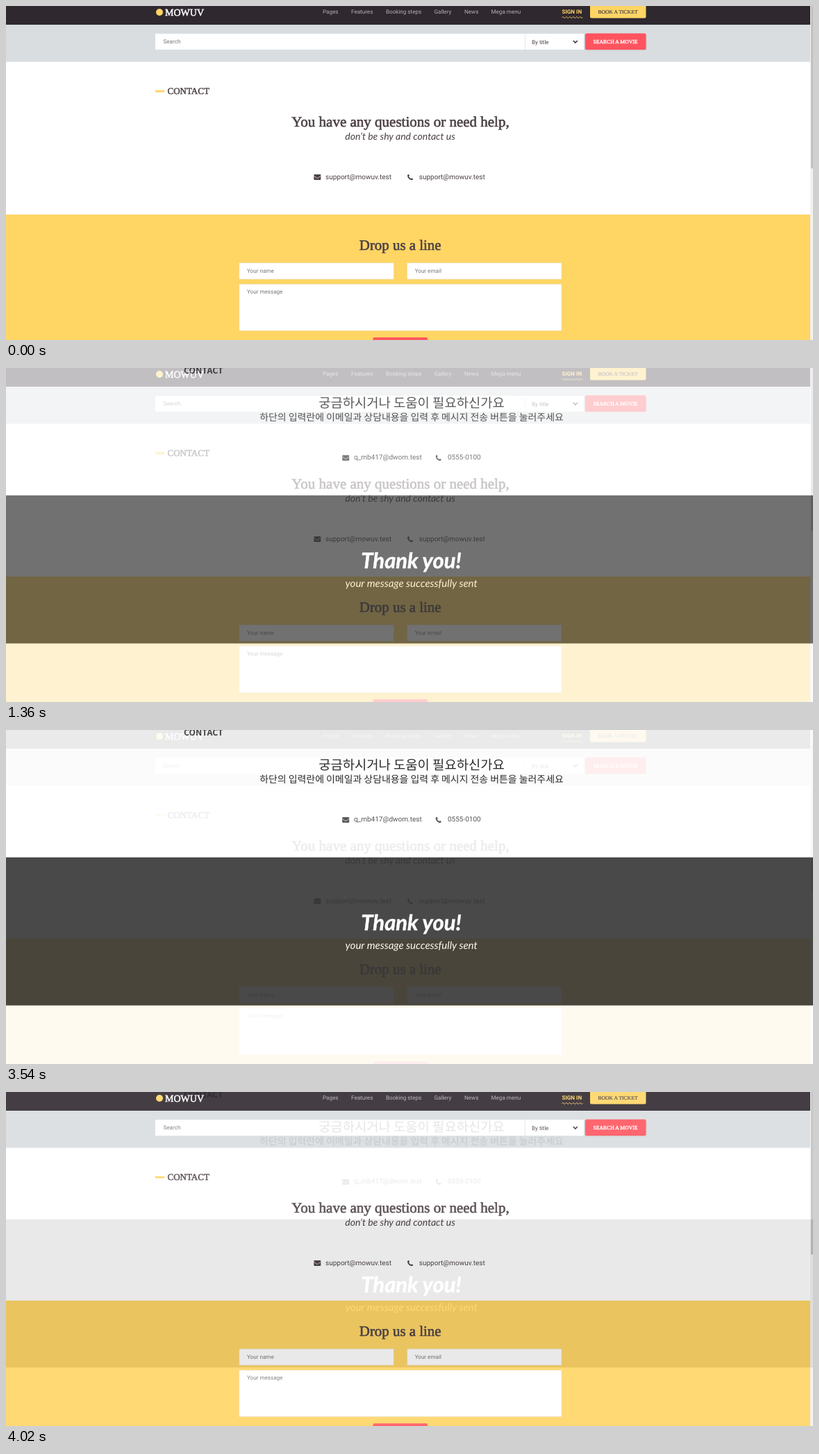
Animation, 1162 px wide and 482 px high, one loop 4080 ms. Source, as an HTML page:

```html
<!DOCTYPE html>
<html lang="en">
<head>
<meta charset="utf-8">
<title>Contact page crossfade</title>
<style>
  html, body { margin: 0; width: 100%; height: 100%; overflow: hidden; background: #fff; }
  svg { display: block; width: 1162px; height: 482px; }
  text { text-rendering: geometricPrecision; white-space: pre; }
  .ui { font-family: Roboto, Arial, sans-serif; font-size: 8.1px; }
  .mail { font-family: Roboto, Arial, sans-serif; font-size: 10px; }
  .slab { font-family: "Liberation Serif", "Times New Roman", serif; stroke-linejoin: round; }
  .slant { font-family: Lato, sans-serif; font-style: italic; }
  .kr { font-family: "Noto Sans CJK KR", "Noto Sans CJK", sans-serif; font-weight: 500; }
  .mid { text-anchor: middle; }
  .hint { fill: #777; }
</style>
</head>
<body>
<svg viewBox="0 0 1162 482" xmlns="http://www.w3.org/2000/svg">
  <defs>
    <g id="envelope">
      <rect width="10" height="8" rx="1"/>
      <path d="M0 2.2 4.2 5.2Q5 5.7 5.8 5.2L10 2.2" fill="none" stroke="#fff" stroke-width=".7"/>
    </g>
    <path id="phone" d="M1.8 0Q.2.5 0 2.1C.3 5.4 3.2 8.4 6.3 8.6Q7.9 8.4 8.2 6.8L6.1 5.5 5 6.5Q2.8 5.4 2 3.4L3 2.4Z"/>
  </defs>

  <g id="formPage">
    <rect width="1162" height="482" fill="#fff"/>
    <rect width="1158" height="27" fill="#2f282f"/>
    <circle cx="221" cy="9" r="5" fill="#ffd564"/>
    <text class="slab" x="229" y="14" font-size="14" fill="#fff" stroke="#fff" stroke-width=".5">MOWUV</text>
    <g id="nav" class="ui" fill="#b5b1b5"></g>
    <text class="ui" x="800.5" y="11" font-weight="700" fill="#ffd564">SIGN IN</text>
    <path id="wave" fill="none" stroke="#ffd564" stroke-width=".9"/>
    <rect x="841" y="-4" width="80.5" height="21.5" rx="2" fill="#ffd564"/>
    <text class="slab mid" x="881" y="11" font-size="7.65" fill="#4c4145" stroke="#4c4145" stroke-width=".2">BOOK A TICKET</text>

    <rect y="27" width="1158" height="53.5" fill="#d9dde0"/>
    <rect x="215" y="40" width="617" height="23" fill="#fff"/>
    <path d="M747.5 40v23" stroke="#e4e6e8"/>
    <text class="ui hint" x="226.5" y="54">Search</text>
    <text class="ui" x="757" y="54.5" fill="#4c4145">By title</text>
    <path d="M816.8 50l3 3 3-3" fill="none" stroke="#3d343a" stroke-width="1.6"/>
    <rect x="833" y="40" width="89.5" height="24.5" rx="3" fill="#8a5f68" opacity=".15"/>
    <rect x="834" y="39.5" width="87.5" height="23.5" rx="2" fill="#ff545f"/>
    <text class="slab mid" x="877.5" y="54" font-size="7.7" fill="#fff" stroke="#fff" stroke-width=".35">SEARCH A MOVIE</text>

    <rect x="215" y="121.5" width="13" height="3" fill="#ffd564"/>
    <g class="slab" fill="#4c4145" stroke="#4c4145">
      <text x="232.5" y="127" font-size="13" stroke-width=".45">CONTACT</text>
      <text class="mid" x="568" y="173.7" font-size="21" stroke-width=".65">You have any questions or need help,</text>
    </g>
    <text class="slant mid" x="567.5" y="192.5" font-size="14" fill="#4c4145">don’t be shy and contact us</text>
    <g class="mail" fill="#4c4145">
      <use href="#envelope" x="443.3" y="243"/>
      <text x="460" y="249.5">support@mowuv.test</text>
      <use href="#phone" x="578" y="242.7"/>
      <text x="594.8" y="249.5">support@mowuv.test</text>
    </g>

    <rect y="301" width="1158" height="181" fill="#ffd564"/>
    <text class="slab mid" x="567.7" y="351.7" font-size="20.9" fill="#4c4145" stroke="#4c4145" stroke-width=".65">Drop us a line</text>
    <g fill="#fff" stroke="#e9dcb4" stroke-width=".7">
      <rect x="335.8" y="370.8" width="222.5" height="23.4"/>
      <rect x="577.5" y="370.8" width="222.5" height="23.4"/>
      <rect x="335.8" y="401.3" width="464.2" height="67.4"/>
    </g>
    <g class="ui hint">
      <text x="347" y="384.5">Your name</text>
      <text x="588.7" y="384.5">Your email</text>
      <text x="347" y="415">Your message</text>
    </g>
    <rect x="528.5" y="478.3" width="78.5" height="10" rx="2" fill="#ff545f"/>

    <rect x="1158" width="4" height="482" fill="#f1f1f1"/>
    <rect x="1159" width="3" height="234.5" fill="#c1c1c1"/>
  </g>

  <g id="thanksPage" opacity="0">
    <rect width="1162" height="482" fill="#fff"/>
    <text class="kr" x="256" y="8" font-size="12.3" style="font-weight:700" fill="#444">CONTACT</text>
    <g class="kr mid" fill="#161616">
      <text x="584" y="57" font-size="18.8">궁금하시거나 도움이 필요하신가요</text>
      <text x="584" y="75.7" font-size="13.92">하단의 입력란에 이메일과 상담내용을 입력 후 메시지 전송 버튼을 눌러주세요</text>
    </g>
    <g class="mail" fill="#444">
      <use href="#envelope" x="484.2" y="125.8"/>
      <text x="501" y="132.2">q_mb417@dwom.test</text>
      <use href="#phone" x="618.7" y="125.3"/>
      <text x="636" y="132.2">0555-0100</text>
    </g>
    <rect y="183.8" width="1162" height="213.7" fill="#363636"/>
    <g class="slant mid" fill="#fff">
      <text x="583.5" y="289" font-size="31" font-weight="700" stroke="#fff" stroke-width=".5">Thank you!</text>
      <text x="583.7" y="315.5" font-size="15">your message successfully sent</text>
    </g>
  </g>
</svg>
<script>
  const LOOP = 4080, STEP = 60, FADE_IN = 1000, FADE_OUT = 3540;
  const byId = id => document.getElementById(id);
  const thanksPage = byId('thanksPage');

  const links = { Pages: 456, Features: 497, 'Booking steps': 547, Gallery: 616.5, News: 660, 'Mega menu': 698.5 };
  byId('nav').innerHTML = Object.entries(links)
    .map(([label, x]) => `<text x="${x}" y="11">${label}</text>`).join('');
  byId('wave').setAttribute('d', 'M800.5 16.5' + 'q1.25 -2 2.5 0t2.5 0'.repeat(6));

  // Both fades move in hard tenths, one every 60 ms.
  function thanksOpacity(t) {
    const tenths = start => Math.min(10, Math.max(0, Math.floor((t - start) / STEP) + 1));
    return (tenths(FADE_IN) - tenths(FADE_OUT)) / 10;
  }

  let start;
  function draw(now) {
    start ??= now;
    thanksPage.setAttribute('opacity', thanksOpacity((now - start) % LOOP));
    requestAnimationFrame(draw);
  }
  requestAnimationFrame(draw);
</script>
</body>
</html>
```
